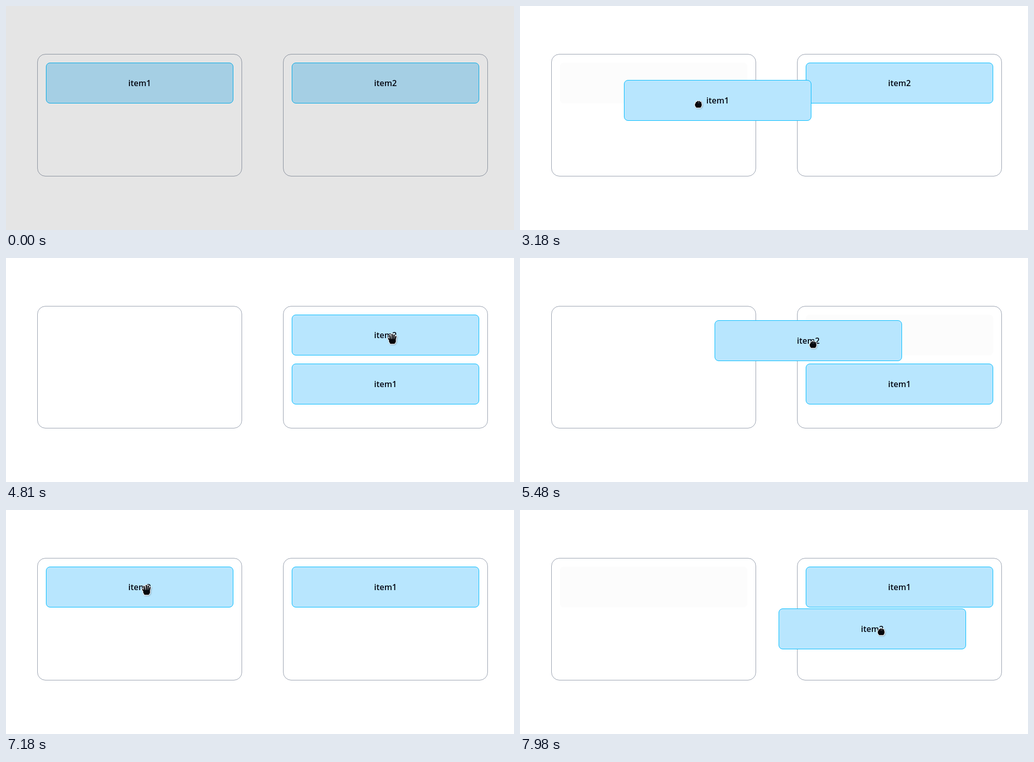
An HTML page that plays this animation: 992 px wide and 439 px high, repeating every 8000 ms.

```html
<!DOCTYPE html>
<html lang="en">
<head>
<meta charset="utf-8">
<title>Drag and drop between two lists</title>
<style>
  html, body { margin: 0; width: 100%; height: 100%; overflow: hidden; background: #fff; }
  div, svg { position: absolute; left: 0; top: 0; box-sizing: border-box; }
  .list { left: 61px; top: 94px; width: 400px; height: 240px; border: 1px solid #99a1af; border-radius: 16px; }
  .list + .list { left: 541px; }
  .item, #ghost { width: 366px; height: 80px; border-radius: 8px; }
  .item {
    border: 1px solid #00bcff; background: #b8e6fe; color: #030712;
    font: 600 16px/78px "Open Sans", "Noto Sans", sans-serif; text-align: center;
  }
  #ghost { background: #fcfcfc; }
  #shade { width: 100%; height: 100%; background: #000; z-index: 2; }
  svg { width: 1px; height: 1px; overflow: visible; z-index: 3; filter: drop-shadow(1px 1px 1px rgba(0, 0, 0, .25)); }
  path { fill: #05070d; stroke: #05070d; stroke-width: 2.6; stroke-linecap: round; stroke-linejoin: round; }
  .halo { stroke: #fff; stroke-width: 4.8; }
  #arrow path { stroke-width: 0; }
  #arrow .halo { stroke-width: 1.6; }
</style>
</head>
<body>
<div class="list"></div>
<div class="list"></div>
<div id="ghost"></div>
<div class="item">item1</div>
<div class="item">item2</div>
<div id="shade"></div>
<svg id="cursor"></svg>
<script>
const LOOP = 8000, STEP = 50, PHASE = 30;
const LEFT = 78, RIGHT = 558, TOP = 111, SECOND = 207;
const SLACK = 4;        // pointer travel before a drag starts
const DROP_DELAY = 40;

// Pointer moves; those with an item drag it and settle it into a slot.
const moves = [
  { from: 1140, to: 1640, end: [140, 59] },
  { from: 1880, to: 2390, end: [219, 158] },
  { from: 2880, to: 3730, end: [670, 277], item: 0, slot: [RIGHT, SECOND], settled: 4140 },
  { from: 4430, to: 4780, end: [754, 158] },
  { from: 5130, to: 5980, end: [262, 187], item: 1, slot: [LEFT, TOP], settled: 6140 },
  { from: 6630, to: 7180, end: [274, 156] },
  { from: 7430, to: 8030, end: [714, 240], item: 1, slot: [RIGHT, SECOND], settled: 8400 }
];
const shapes = {
  arrow: "M0 .5V18.5L4.3 14L12 12.2Z",
  open: "M-3 3L-4.5 -6M0 2V-8M3 2L3.8 -7M5.5 3L7.2 -4M-3 5L-7 0M-4 2H6V6L4 9H-3L-5 5Z",
  fist: "M-3.5 -3V3M-1 -4.6V2M2 -4.6V2M4.8 -3.2V3M-5 0V2M-5 0H5.5V3L4 6H-3L-5 3Z"
};

const $ = id => document.getElementById(id);
const items = document.querySelectorAll(".item");
const clamp = (v, lo, hi) => Math.min(hi, Math.max(lo, v));
const progress = (t, from, to) => clamp((t - from) / (to - from), 0, 1);
const smooth = u => u * u * (3 - 2 * u);
const mix = (a, b, u) => a.map((v, i) => Math.round(v + (b[i] - v) * u));
const place = (el, [x, y]) => el.style.transform = `translate(${x}px, ${y}px)`;

$("cursor").innerHTML = Object.entries(shapes).map(([id, d]) =>
  `<g id="${id}"><path class="halo" d="${d}"/><path d="${d}"/></g>`
).join("");

function draw(t) {
  const pos = [[LEFT, TOP], [RIGHT, TOP]];
  let pointer = [38, -26], front = 0, ghost = null;

  for (const { from, to, end, item, slot, settled } of moves) {
    if (t < from) break;
    const drags = item !== undefined, u = progress(t, from, to);
    const next = mix(pointer, end, drags ? smooth(u) : u);
    if (drags) {
      const home = pos[item], other = pos[1 - item];
      const dx = next[0] - pointer[0], dy = next[1] - pointer[1];
      const held = [home[0] + dx - clamp(dx, -SLACK, SLACK), home[1] + dy];
      const drop = to + DROP_DELAY, fall = smooth(progress(t, drop, settled));
      pos[item] = mix(held, slot, fall);
      pos[1 - item] = mix(other, [other[0], TOP], fall);
      front = item;
      ghost = t > from && t < drop ? home : null;
    }
    pointer = next;
  }

  items.forEach((el, i) => {
    place(el, pos[i]);
    el.style.zIndex = i === front ? 1 : 0;
  });
  $("ghost").hidden = !ghost;
  if (ghost) place($("ghost"), ghost);

  const shape = ghost ? "fist" : pointer[1] < TOP ? "arrow" : "open";
  for (const id in shapes) $(id).style.display = id === shape ? "" : "none";
  place($("cursor"), pointer);
  $("shade").style.opacity = .1 * (1 - progress(t, 1140, 1640));
}

const start = performance.now();
function tick() {
  const t = (performance.now() - start) % LOOP;
  draw(Math.floor((t - PHASE) / STEP) * STEP + PHASE);
  requestAnimationFrame(tick);
}
tick();
</script>
</body>
</html>
```
